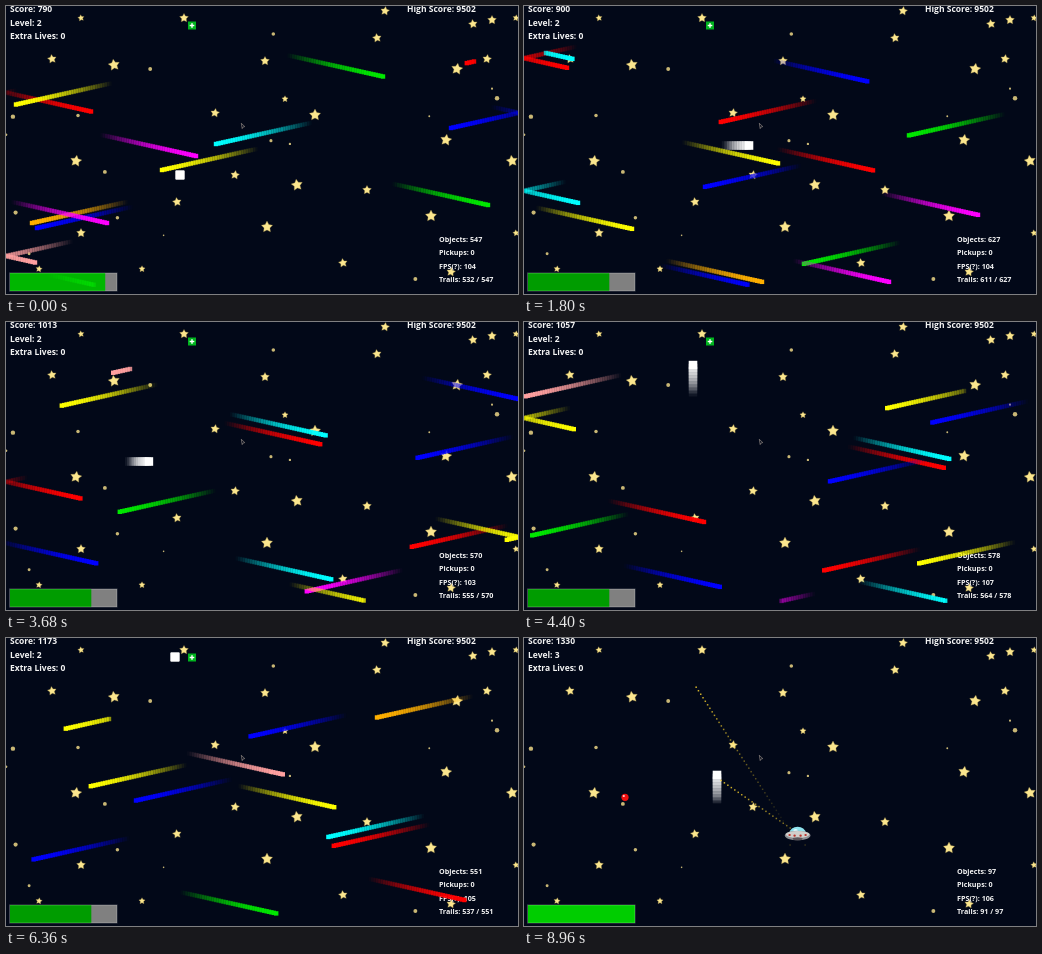
Recreate the animation shown at these times as an HTML page with a canvas. Size 512x288 px, loop 9000 ms.

```html
<!DOCTYPE html>
<html lang="en">
<head>
<meta charset="utf-8">
<title>Space dodge</title>
<style>
  html, body { margin: 0; width: 100%; height: 100%; overflow: hidden; background: #020818; }
  canvas { display: block; width: 512px; height: 288px; }
</style>
</head>
<body>
<canvas id="stage" width="512" height="288"></canvas>
<script>
const ctx = document.getElementById('stage').getContext('2d');
const LOOP = 9000, STEP = 40;
const SPEED_X = 2.4, SPEED_Y = 0.535, WALL = 513, FLOOR = 279;
const ENEMY_SIZE = 4.4, TRAIL_LIFE = 40, PLAYER_SIZE = 8.6, PLAYER_LIFE = 10;
const HIT_TICK = 65, PICKUP_TICK = 404, BOSS_TICK = 460;
const FIRST_SHOT = 500, SHOT_GAP = 20, BULLET_SPEED = 4.2;

// time, score, trail count, frame rate; the score counts game ticks
const COUNTERS = [
  [0, 790, 532, 104], [1800, 900, 611, 104], [2920, 966, 545, 103], [4400, 1057, 564, 107],
  [5560, 1126, 539, 105], [7200, 1222, 535, 104], [8960, 1330, 91, 106]
];

// tick, x, y
const PLAYER_PATH = [
  [0, 174, 169], [90, 174, 139.5], [110, 225, 139.5], [125, 262, 139.5], [176, 113, 139.5],
  [190, 71, 139.5], [235, 169, 139.5], [275, 169, 19], [320, 169, 43], [328, 169, 19],
  [400, 169, 19], [408, 193, 18.5], [479, 193, 18.5], [519, 193, 138], [532, 193, 161], [540, 193, 137]
];

const COLORS = { r: '#f00', y: '#ff0', m: '#f0f', c: '#0ff', g: '#00e800', b: '#00f', o: '#ffb000', p: '#ffa0a0' };

// A negative x means that far from the left wall and heading towards it.
const enemy = (start, birth) => ([color, x, y]) => ({ color: COLORS[color], x, y, start, birth });
const spawn = (birth, ...spec) => enemy(birth, birth)(spec);
const ENEMIES = [
  ...[
    ['g', 138, 290], ['r', 85, 105.5], ['y', -10, 98.5], ['m', 190, 150], ['c', -210, 138],
    ['y', -156, 164], ['g', 377, 70.5], ['b', -445, 122], ['g', 482, 199], ['o', -26, 217],
    ['b', -31, 222], ['m', 101, 217], ['p', 29, 256.5]
  ].map(enemy(0, -90)),
  spawn(-3, 'r', -468, 55.5), spawn(45, 'r', -113, 27), spawn(72, 'b', 252, 55), spawn(99, 'c', 22, 47),
  spawn(120, 'y', -303, 28.5), spawn(168, 'b', 380, 47.5), spawn(216, 'p', -124, 47),
  spawn(235, 'y', -440, 69), spawn(298, 'o', 451, 34), spawn(302, 'b', -439, 55),
  spawn(365, 'y', -103, 81), spawn(393, 'g', 361, 64), spawn(405, 'g', -242, 39.5)
];

const star = radius => ([x, y]) => ({ x, y, radius });
const BRIGHT_STARS = [
  ...[[108, 59], [309, 109], [70, 155], [291, 179], [261, 221], [451, 63], [506, 155], [425, 210], [440, 134]]
    .map(star(5.9)),
  ...[[46, 53], [259, 55], [209, 107], [171, 196], [75, 227], [229, 169], [337, 257], [361, 184],
    [481, 53], [467, 18], [486, 14], [379, 5], [371, 32], [178, 12], [445, 266]].map(star(4.6)),
  ...[[75, 12], [279, 93], [510, 12], [510, 227], [136, 263], [33, 263]].map(star(3.3))
];

let seed = 11;
function random() {
  seed = (seed * 16807) % 2147483647;
  return seed / 2147483647;
}
const FAINT_STARS = Array.from({ length: 16 }, () =>
  ({ x: random() * 512, y: random() * 288, radius: 0.8 + random() * 1.6 }));

function keysAt(keys, at) {
  const i = Math.max(1, keys.findIndex(key => at <= key[0]));
  const from = keys[i - 1], to = keys[i];
  const p = Math.min(1, Math.max(0, (at - from[0]) / (to[0] - from[0])));
  return from.map((value, k) => value + (to[k] - value) * p);
}

function bounce(x) {
  const phase = ((x % (2 * WALL)) + 2 * WALL) % (2 * WALL);
  return phase > WALL ? 2 * WALL - phase : phase;
}

function box(x, y, w, h, color) {
  ctx.fillStyle = color;
  ctx.fillRect(x, y, w, h);
}

function square(x, y, size, color, alpha) {
  ctx.globalAlpha = alpha;
  box(x - size / 2, y - size / 2, size, size, color);
  ctx.globalAlpha = 1;
}

function oval(x, y, rx, ry, color, from = 0, to = Math.PI * 2) {
  ctx.fillStyle = color;
  ctx.beginPath();
  ctx.ellipse(x, y, rx, ry, 0, from, to);
  ctx.fill();
}

function label(text, x, y, size) {
  ctx.font = `bold ${size}px "Open Sans", "Noto Sans", sans-serif`;
  ctx.fillStyle = '#f4f4f4';
  ctx.fillText(text, x, y);
}

function drawStar({ x, y, radius }, index) {
  const tilt = (index % 3 - 1) * 0.15;
  ctx.beginPath();
  for (let k = 0; k < 10; k++) {
    const angle = tilt - Math.PI / 2 + k * Math.PI / 5;
    const reach = k % 2 ? radius * 0.52 : radius;
    ctx.lineTo(x + reach * Math.cos(angle), y + reach * Math.sin(angle));
  }
  ctx.closePath();
  ctx.fillStyle = '#fbe68e';
  ctx.fill();
  ctx.strokeStyle = 'rgba(150, 128, 66, 0.5)';
  ctx.lineWidth = 0.7;
  ctx.stroke();
}

function drawHealth(tick) {
  const health = tick < HIT_TICK ? 0.89 : tick < PICKUP_TICK ? 0.76 : 1;
  box(4, 267, 107, 18, '#808080');
  box(4, 267, 107 * health, 18, `rgb(0,${Math.round(205 * health)},0)`);
  ctx.strokeStyle = 'rgba(255, 255, 255, 0.25)';
  ctx.lineWidth = 1;
  ctx.strokeRect(3.5, 267, 107.5, 18);
}

function drawLabels(tick, trails, fps) {
  const alive = ENEMIES.filter(e => e.birth <= tick && tick <= lastTick(e)).length;
  const boss = tick < BOSS_TICK ? 0 : 2 + shotTicks(tick).length;
  const objects = trails + alive + boss + 2;

  ['Score: ' + (790 + tick), 'Level: ' + (boss ? 3 : 2), 'Extra Lives: 0']
    .forEach((text, row) => label(text, 4, 6 + row * 13.5, 8.5));
  label('High Score: 9502', 401, 6, 8.5);
  ['Objects: ' + objects, 'Pickups: 0', 'FPS(?): ' + fps, `Trails: ${trails} / ${objects}`]
    .forEach((text, row) => label(text, 433, 235.5 + row * 13.5, 7.2));
}

function drawPickup() {
  box(182, 15.5, 8, 8, '#00b41e');
  box(185.3, 17.2, 1.4, 4.6, '#fff');
  box(183.7, 18.8, 4.6, 1.4, '#fff');
}

function lastTick({ y, start }) {
  return Math.min(start + (FLOOR - y) / SPEED_Y, BOSS_TICK);
}

function drawEnemy(e, tick) {
  const end = Math.min(tick, lastTick(e));
  for (let k = Math.max(e.birth, tick - TRAIL_LIFE + 1); k <= end; k++) {
    const x = bounce(e.x + SPEED_X * (k - e.start));
    const y = e.y + SPEED_Y * (k - e.start);
    square(x, y, ENEMY_SIZE, e.color, 1 - (tick - k) / TRAIL_LIFE);
  }
}

function drawPlayer(tick) {
  for (let age = PLAYER_LIFE; age >= 0; age--) {
    const [, x, y] = keysAt(PLAYER_PATH, Math.max(0, tick - age));
    square(x, y, PLAYER_SIZE, '#fff', age ? 0.6 * (1 - age / PLAYER_LIFE) : 1);
  }
}

function ufoAt(tick) {
  const age = tick - BOSS_TICK;
  const left = Math.max(0, 1 - age / 38);
  return { x: 264 + age * 0.12, y: 196 - 210 * left ** 2 };
}

function shotTicks(tick) {
  const shots = [];
  for (let t = FIRST_SHOT; t < tick; t += SHOT_GAP) shots.push(t);
  return shots;
}

// Each shot is aimed at where the player was when it was fired.
function drawBullet(birth, tick) {
  const ufo = ufoAt(birth);
  const x = ufo.x - 5, y = ufo.y - 6;
  const [, playerX, playerY] = keysAt(PLAYER_PATH, birth);
  const angle = Math.atan2(playerY - y, playerX - x);
  for (let k = Math.max(birth, tick - TRAIL_LIFE); k <= tick; k++) {
    const reach = BULLET_SPEED * (k - birth);
    square(x + reach * Math.cos(angle), y + reach * Math.sin(angle), 1.5, '#ffd72e',
      0.85 * (1 - (tick - k) / (TRAIL_LIFE + 2)));
  }
}

function drawUfo(tick) {
  const { x, y } = ufoAt(tick);
  oval(x, y - 1, 8, 6.2, '#8fe3ee', Math.PI, 0);
  oval(x - 2, y - 3, 2.2, 2, '#e2fbff');
  oval(x, y + 1.5, 12.8, 4.8, '#8b8f94');
  oval(x, y + 0.5, 11.8, 3.4, '#d0cfcb');
  for (const dx of [-8, -3, 3, 8]) oval(x + dx, y + 2 - Math.abs(dx) / 8, 1.2, 1.1, '#b8322a');
  oval(x, y + 4.8, 5, 1.5, '#5b5559');
  for (const dx of [-7.5, 7.5]) square(x + dx, y + 11, 1, '#75631f', 1);
}

function drawMine() {
  oval(101, 159.3, 3.6, 3.6, '#f01010');
  oval(99.8, 158, 1.1, 1.1, '#ffd0d0');
}

function drawCursor() {
  ctx.strokeStyle = '#a89c94';
  ctx.lineWidth = 0.6;
  ctx.stroke(new Path2D('M235.3 117.3L238.8 120.6L237 121L236.2 122.6Z'));
}

function draw(time) {
  const [, score, trails] = keysAt(COUNTERS, time).map(Math.round);
  const fps = COUNTERS.filter(row => row[0] <= time).pop()[3];
  const tick = score - 790;
  box(0, 0, 512, 288, '#020818');
  for (const { x, y, radius } of FAINT_STARS) oval(x, y, radius, radius, '#c9b775');
  BRIGHT_STARS.forEach(drawStar);
  drawHealth(tick);
  drawLabels(tick, trails, fps);
  if (tick < PICKUP_TICK) drawPickup();
  for (const e of ENEMIES) drawEnemy(e, tick);
  drawPlayer(tick);
  if (tick >= BOSS_TICK) {
    for (const birth of shotTicks(tick)) drawBullet(birth, tick);
    drawUfo(tick);
    drawMine();
  }
  drawCursor();
}

const begin = performance.now();
function loop() {
  const elapsed = (performance.now() - begin) % LOOP;
  draw(Math.min(Math.floor(elapsed / STEP) * STEP, LOOP - STEP));
  requestAnimationFrame(loop);
}
loop();
</script>
</body>
</html>
```
